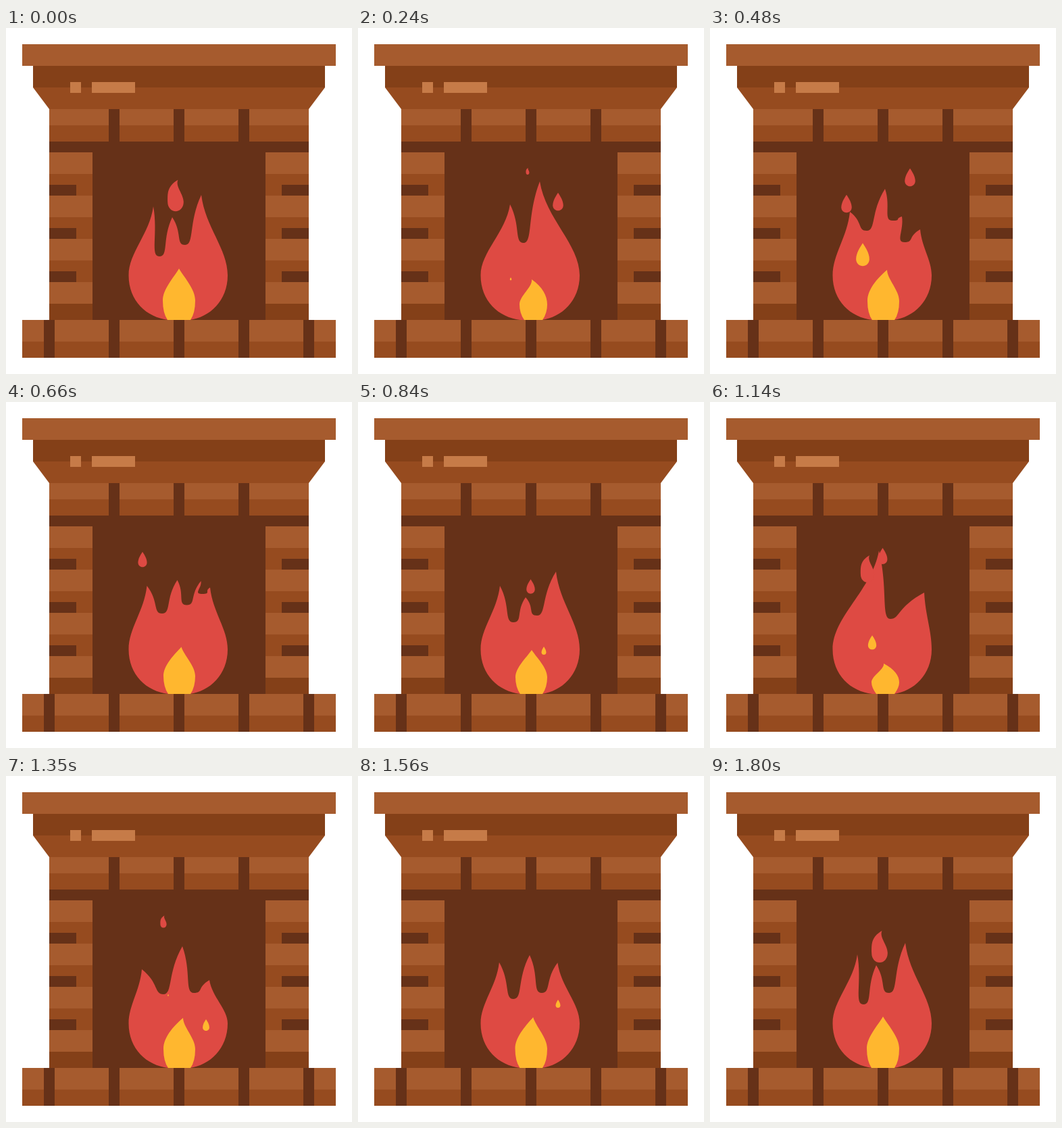
An HTML page with a canvas for the animation above (1.83 s loop, 512 px wide and 512 px high).

```html
<!DOCTYPE html>
<html lang="en">
<head>
<meta charset="utf-8">
<title>Fireplace</title>
<style>
html, body { margin: 0; height: 100%; overflow: hidden; background: #fff; }
canvas { display: block; width: 100vmin; height: 100vmin; }
</style>
</head>
<body>
<canvas id="stage" width="512" height="512"></canvas>
<script>
const ctx = document.getElementById('stage').getContext('2d');
const LOOP = 1830, STEP = 30, FLOOR = 432, SPEED = .15;
const LIGHT = '#a65b2e', MID = '#964b1f', DARK = '#844018', SOOT = '#663118',
      SHINE = '#c67b48', RED = '#de4a43', YELLOW = '#ffb72f';

const mix = (a, b, k) => a.map((v, i) => v + (b[i] - v) * k);

// Flame crests: tip, valley, tip, ...
const calm = [[218, 264], [227, 338], [246, 280], [265, 321], [289, 247]];
const tall = [[225, 261], [245, 318], [269, 227]];
const ragged = [[207, 272], [232, 300], [259, 238], [270, 285], [284, 279], [288, 317], [311, 298]];
const low = [[210, 272], [230, 326], [248, 289], [265, 316], [293, 251]];
const hook = [[250, 220], [267, 321], [317, 282]];
const crown = [[201, 286], [233, 323], [261, 252], [278, 321], [301, 302]];

// Repeated points let tips split off an end or sink into a valley
const padRight = pts => [...pts, ...Array(7 - pts.length).fill(pts[pts.length - 1])];
const padLeft = pts => [...Array(7 - pts.length).fill(pts[0]), ...pts];
const sinkMiddle = ([a, v, c]) => padRight([a, v, v, v, c]);

// Yellow core: left edge, tip x, tip y, bend
const still = [232, 256, 356, 0], short = [239, 257, 372, 8], lean = [233, 262, 358, -6],
      soft = [233, 257, 367, 0], stub = [239, 257, 387, 8];

// from, to, crest pair, core pair
const moves = [
  [0, 240, padRight(calm), sinkMiddle(tall), still, short],
  [240, 480, padRight(tall), ragged, short, lean],
  [480, 840, ragged, padRight(low), lean, soft],
  [840, 1140, padRight(low), sinkMiddle(hook), soft, stub],
  [1140, 1350, padLeft(hook), padLeft(crown), stub, lean],
  [1350, LOOP - STEP, padRight(crown), padRight(calm), lean, still]
];

// Sparks: colour, birth, x, centre y at birth, full height, bend
const sparks = [
  [RED, 60, 296, 284, 33, 0],
  [RED, 240, 202, 296, 28, 0],
  [RED, 700, 255.5, 294, 32, 0],
  [RED, 840, 233, 292, 40, .15],
  [RED, 1510, 251, 296, 47, .15],
  [YELLOW, 228, 226, 373, 42, 0],
  [YELLOW, 780, 275, 377, 24, 0],
  [YELLOW, 1005, 240, 376, 23, 0],
  [YELLOW, 1260, 296, 382, 24, 0]
];

function rect(color, x, y, w, h) {
  ctx.fillStyle = color;
  ctx.fillRect(x, y, w, h);
}

function fillPath(color, trace) {
  ctx.fillStyle = color;
  ctx.beginPath();
  trace();
  ctx.fill();
}

const curve = (a, b, end) => ctx.bezierCurveTo(...a, ...b, ...end);

function drawBody(crest) {
  const left = [181.5, 366], right = [328, 366], bulb = 14;
  const rise = (foot, tip) => [foot[0], foot[1] + (tip[1] - foot[1]) * .33];
  const flank = (foot, tip) => [tip[0] + (foot[0] - tip[0]) * .15, tip[1] + (foot[1] - tip[1]) * .4];
  const inner = (tip, dip) => [tip[0] + (dip[0] - tip[0]) * .8, tip[1] + (dip[1] - tip[1]) * .55];
  const first = crest[0], last = crest[crest.length - 1];
  fillPath(RED, () => {
    ctx.moveTo(...left);
    curve(rise(left, first), flank(left, first), first);
    for (let i = 1; i < crest.length; i += 2) {
      const dip = crest[i], [x, y] = dip, next = crest[i + 1];
      curve(inner(crest[i - 1], dip), [x - bulb, y], dip);
      curve([x + bulb, y], inner(next, dip), next);
    }
    curve(flank(right, last), rise(right, last), right);
    curve([328, 404], [301, 428], [272, FLOOR]);
    ctx.lineTo(240, FLOOR);
    curve([208, 428], [181.5, 404], left);
  });
}

function drawCore([left, x, y, bend]) {
  const right = 280, wide = y + (FLOOR - y) * .62, h = wide - y;
  const shoulder = edge => [x + (edge - x) * .35 + bend, y + h * .3];
  fillPath(YELLOW, () => {
    ctx.moveTo(left + 7, FLOOR);
    ctx.quadraticCurveTo(left, FLOOR - 10, left, wide);
    curve([left, wide - h * .35], shoulder(left), [x, y]);
    curve(shoulder(right), [right, wide - h * .35], [right, wide]);
    ctx.quadraticCurveTo(right, FLOOR - 10, right - 7, FLOOR);
  });
}

function drawDrop(color, x, y, h, bend) {
  const w = .29 - bend / 4;
  const at = (u, v) => [x + u * h, y + (v - .5) * h];
  fillPath(color, () => {
    ctx.moveTo(...at(bend / 2, 0));
    curve(at(-.13 - bend, .2), at(-w, .45), at(-w, .7));
    curve(at(-w, .89), at(-w / 2, 1), at(0, 1));
    curve(at(w / 2, 1), at(w, .89), at(w, .7));
    curve(at(w, .45), at(.13 - bend, .2), at(bend / 2, 0));
  });
}

// Each spark rises steadily while it swells and shrinks
function drawSparks(color, t) {
  const life = color === RED ? 600 : 360;
  for (const [tint, birth, x, y, size, bend] of sparks) {
    const age = (t - birth + LOOP) % LOOP;
    if (tint === color && age < life) {
      drawDrop(color, x, y - SPEED * age, size * Math.sin(Math.PI * age / life), bend);
    }
  }
}

function drawFire(t) {
  const [from, to, crestA, crestB, coreA, coreB] = moves.find(m => t <= m[1]);
  const k = (t - from) / (to - from);
  drawBody(crestA.map((p, i) => mix(p, crestB[i], k)));
  drawSparks(RED, t);
  drawCore(mix(coreA, coreB, k));
  drawSparks(YELLOW, t);
}

function drawHearth() {
  rect('#fff', 0, 0, 512, 512);
  rect(LIGHT, 24, 24, 464, 32);
  rect(DARK, 40, 56, 432, 32);
  fillPath(MID, () => {
    for (const p of [[40, 88], [472, 88], [448, 120], [64, 120]]) ctx.lineTo(...p);
  });
  rect(SHINE, 95, 80, 16, 16);
  rect(SHINE, 127, 80, 64, 16);
  rect(LIGHT, 64, 120, 384, 24);
  rect(MID, 64, 144, 384, 24);
  for (let x = 152; x < 350; x += 96) rect(SOOT, x, 120, 16, 48);
  rect(SOOT, 64, 168, 384, 264);
  for (const x of [64, 384]) {
    rect(DARK, x, 408, 64, 24);
    for (let y = 184; y < FLOOR; y += 64) rect(LIGHT, x, y, 64, 32);
    for (let y = 216; y < 400; y += 64) {
      rect(MID, x, y, 64, 32);
      rect(SOOT, x === 64 ? 64 : 408, y + 16, 40, 16);
    }
  }
}

function drawBase() {
  rect(LIGHT, 24, FLOOR, 464, 32);
  rect(MID, 24, 464, 464, 24);
  for (let x = 56; x < 450; x += 96) rect(SOOT, x, FLOOR, 16, 56);
}

const start = performance.now();
function frame() {
  const t = Math.floor((performance.now() - start) % LOOP / STEP) * STEP;
  drawHearth();
  drawFire(t);
  drawBase();
  requestAnimationFrame(frame);
}
frame();
</script>
</body>
</html>
```
